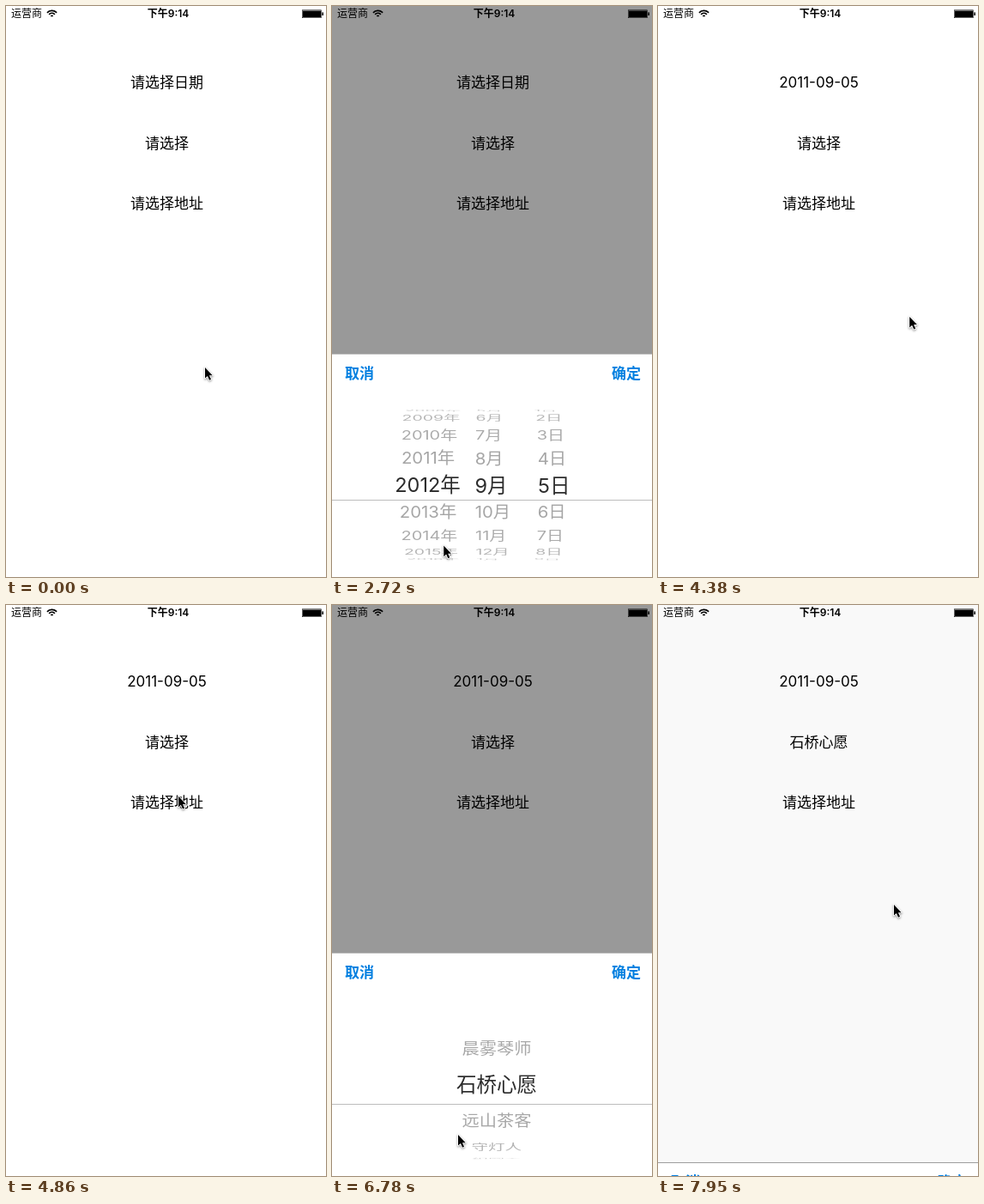
Animation, 373 px wide and 665 px high, one loop 8000 ms. Source, as an HTML page with a canvas:

```html
<!DOCTYPE html>
<html lang="zh-CN">
<head>
<meta charset="utf-8">
<title>选择器</title>
<style>
html, body { margin: 0; width: 100%; height: 100%; overflow: hidden; background: #fff; }
canvas { display: block; }
</style>
</head>
<body>
<canvas id="stage" width="373" height="665"></canvas>
<script>
const W = 373, H = 665, LOOP = 8000, MID = 187.5;
const PANEL_HEIGHT = 259.4, SLIDE = 239;
const WHEEL_Y = 152.4, WHEEL_RADIUS = 87;
const BLUE = '#007fe0';
const FONT = 'Inter, "Noto Sans CJK SC", "Noto Sans CJK", sans-serif';
const HEROES = ['晨雾琴师', '石桥心愿', '远山茶客', '守灯人', '织网人'];
const ctx = document.getElementById('stage').getContext('2d');

const clamp = v => Math.min(1, Math.max(0, v));
const smooth = u => u * u * (3 - 2 * u);
const ramp = (t, start, end) => smooth(clamp((t - start) / (end - start)));
const cycle = (i, n) => (i - 1 + n) % n + 1;
const labelY = i => 89 + 70.4 * i;

// Each panel: its times, row pitch, half height of the selection band, and columns.
const DATE_PANEL = {
  open: 1522, press: 3990, close: 4070, pitch: 32.2, band: 17,
  columns: t => [
    { value: draggedYear(t), x: 111.5, align: 'center', label: i => i + '年' },
    { value: 9, x: 166.5, align: 'left', label: i => cycle(i, 12) + '月' },
    { value: 5, x: 240, align: 'left', label: i => cycle(i, 30) + '日' }
  ]
};
const HERO_PANEL = {
  open: 5275, press: 7670, close: 7753, pitch: 43.8, band: 23.5,
  columns: t => [
    { value: ramp(t, 6190, 6490), x: 192, align: 'center', label: i => HEROES[i] }
  ]
};

// The drag stops just short of a row; the wheel then settles on 2011.
function draggedYear(t) {
  const drag = 4.1;
  return 2016 - drag * ramp(t, 2450, 2750) - (5 - drag) * ramp(t, 2750, 3250);
}

const CONFIRM = { x: 339, y: 431 };
const CURSOR_START = { x: 232, y: 421 };
const CURSOR_MOVES = [
  { from: 300, to: 1280, x: 192, y: labelY(0) + 5, bow: 45 },
  { from: 1700, to: 1910, x: 155, y: 354 },
  { from: 2100, to: 2450, x: 140, y: 500 },
  { from: 2450, to: 2750, x: 130, y: 632 },
  { from: 3150, to: 3690, x: 318, y: 463 },
  { from: 3800, to: 3960, ...CONFIRM },
  { from: 4080, to: 4860, x: 201, y: labelY(2) - 7 },
  { from: 4860, to: 5040, x: 190, y: labelY(1) },
  { from: 5320, to: 5660, x: 139, y: 471 },
  { from: 5850, to: 6130, x: 147, y: 617 },
  { from: 6780, to: 7370, ...CONFIRM },
  { from: 7795, to: 7950, x: 275, y: 349 }
];

function cursorAt(t) {
  let { x, y } = CURSOR_START;
  for (const move of CURSOR_MOVES) {
    const p = ramp(t, move.from, move.to);
    x += (move.x - x) * p + (move.bow || 0) * Math.sin(Math.PI * p);
    y += (move.y - y) * p;
  }
  return [x, y];
}

// cubic-bezier(.42, 0, .58, 1)
function easeInOut(x) {
  let lo = 0, hi = 1;
  for (let i = 0; i < 20; i++) {
    const u = (lo + hi) / 2, v = 1 - u;
    if (1.26 * v * v * u + 1.74 * v * u * u + u ** 3 < x) lo = u; else hi = u;
  }
  return smooth(lo);
}
const slide = (t, start) => easeInOut(clamp((t - start) / SLIDE));

// Text centred vertically on y.
function text(str, x, y, size, { align = 'center', weight = 400, color = '#000' } = {}) {
  ctx.font = `${weight} ${size}px ${FONT}`;
  ctx.textAlign = align;
  ctx.fillStyle = color;
  ctx.fillText(str, x, y + size * 0.37);
}

function hline(y, color) {
  ctx.fillStyle = color;
  ctx.fillRect(0, Math.round(y), W, 1);
}

function clipped(y, height, draw) {
  ctx.save();
  ctx.beginPath();
  ctx.rect(0, y, W, height);
  ctx.clip();
  draw();
  ctx.restore();
}

function statusBar() {
  text('运营商', 6, 9, 12, { align: 'left' });
  text('下午9:14', 189, 9, 12, { weight: 600 });
  ctx.strokeStyle = ctx.fillStyle = '#000';
  ctx.lineWidth = 1.7;
  for (let r = 1.6; r < 8; r += 3) {
    ctx.beginPath();
    ctx.arc(53.5, 13, r, -Math.PI * 0.76, -Math.PI * 0.24);
    ctx.stroke();
  }
  ctx.lineWidth = 0.6;
  ctx.strokeRect(345.3, 4.8, 22.4, 8.9);
  ctx.fillRect(346, 5.5, 21, 7.5);
  ctx.fillRect(368.4, 7.4, 1.5, 3.6);
}

function wheelRows(columns, cy, step, magnified) {
  for (const { value, x, align, label } of columns) {
    const base = Math.round(value);
    for (let i = base - 4; i <= base + 4; i++) {
      const angle = (i - value) * step, tilt = Math.cos(angle);
      const str = label(i);
      if (tilt < 0.03 || !str) continue;
      const shrink = magnified ? 1 : 1 / (1 + 0.1 * (1 - tilt));
      const color = magnified ? '#2c2c2c' : `rgba(0,0,0,${0.15 + 0.21 * Math.sqrt(tilt)})`;
      ctx.save();
      ctx.translate(MID, cy + WHEEL_RADIUS * Math.sin(angle) * (magnified ? 1.12 : 1));
      ctx.scale(shrink, shrink * tilt);
      text(str, x - MID, 0, magnified ? 23.5 : 20.5, { align, color });
      ctx.restore();
    }
  }
}

function wheel(columns, cy, step, band) {
  const reach = WHEEL_RADIUS + 2;
  const rows = magnified => () => wheelRows(columns, cy, step, magnified);
  clipped(cy - reach, reach - band, rows(false));
  clipped(cy + band, reach - band, rows(false));
  clipped(cy - band, 2 * band, rows(true));
}

function panel(t, { open, press, close, pitch, band, columns }) {
  const shown = slide(t, open) - slide(t, close);
  if (shown <= 0) return;
  ctx.fillStyle = `rgba(0,0,0,${0.4 * shown})`;
  ctx.fillRect(0, 0, W, H);

  const y = H - PANEL_HEIGHT * shown, cy = y + WHEEL_Y;
  ctx.fillStyle = '#fff';
  ctx.fillRect(0, y, W, PANEL_HEIGHT + 1);
  text('取消', 15, y + 22.4, 17, { align: 'left', weight: 600, color: BLUE });
  ctx.globalAlpha = t < press ? 1 : 0.3 + 0.7 * clamp((t - press - 130) / 100);
  text('确定', 360, y + 22.4, 17, { align: 'right', weight: 600, color: BLUE });
  ctx.globalAlpha = 1;
  wheel(columns(t), cy, pitch / WHEEL_RADIUS, band);

  // Different hairlines survive while the panel slides away.
  if (t < close) {
    hline(cy + band - 0.4, '#bdbdbd');
  } else {
    hline(y - 1, 'rgba(0,0,0,.38)');
    hline(y + 43.4, '#c4c4c4');
    hline(cy - band - 0.4, '#c4c4c4');
  }
}

const ARROW = new Path2D('M0 0V14L3.2 11L5.6 16.3L7.8 15.3L5.5 10.2H9.7Z');

function cursor(t) {
  ctx.save();
  ctx.translate(...cursorAt(t));
  ctx.scale(0.9, 0.9);
  ctx.lineJoin = 'round';
  ctx.lineWidth = 2;
  ctx.strokeStyle = '#fff';
  ctx.shadowColor = 'rgba(0,0,0,.45)';
  ctx.shadowBlur = 2.5;
  ctx.shadowOffsetY = 1;
  ctx.stroke(ARROW);
  ctx.shadowColor = 'transparent';
  ctx.fillStyle = '#000';
  ctx.fill(ARROW);
  ctx.restore();
}

function draw(t) {
  ctx.fillStyle = '#fff';
  ctx.fillRect(0, 0, W, H);
  statusBar();
  const labels = [
    t < DATE_PANEL.close ? '请选择日期' : '2011-09-05',
    t < HERO_PANEL.close ? '请选择' : HEROES[1],
    '请选择地址'
  ];
  labels.forEach((label, i) => text(label, MID, labelY(i), 17));
  panel(t, DATE_PANEL);
  panel(t, HERO_PANEL);
  cursor(t);
}

function frame() {
  draw(performance.now() % LOOP);
  requestAnimationFrame(frame);
}
frame();
</script>
</body>
</html>
```
